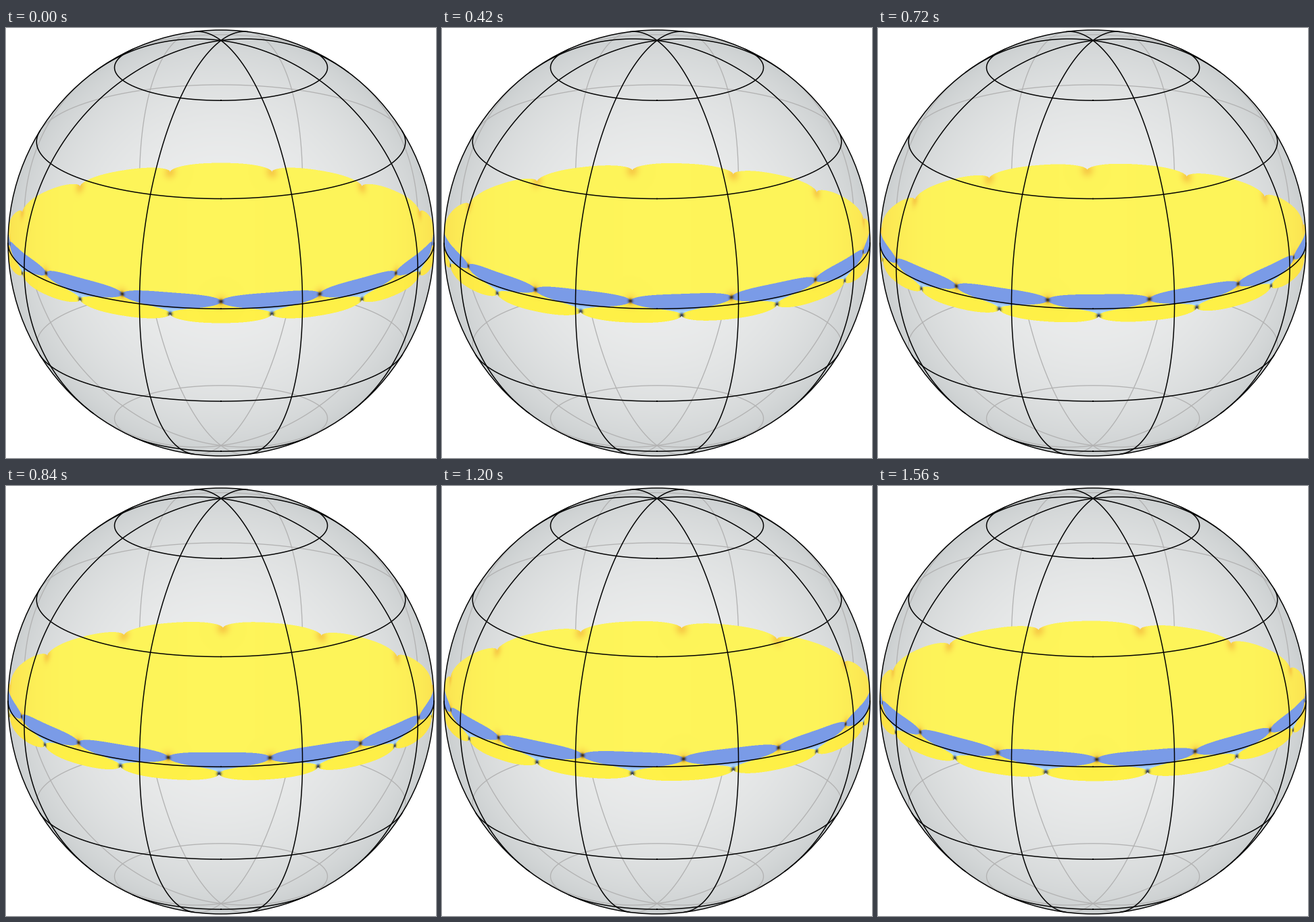
A matplotlib script that plays this animation: 636 px wide and 636 px high, repeating every 1620 ms.

```python
import numpy as np
import matplotlib.pyplot as plt
from matplotlib.animation import FuncAnimation
from matplotlib.patches import Circle

SIZE, FRAMES, INTERVAL = 636, 27, 60
CENTER, R = 318, 315
TILT = np.radians(18)
SIN, COS = np.sin(TILT), np.cos(TILT)

LOBES = 13            # corrugations around the equator
RIM = 0.998           # radius of the corrugated band
H = 0.0355            # height of a cusp, and half the height of a lobe
Y0, Y1, SS = 190, 446, 2

YELLOW = (254, 245, 90)
LOBE_YELLOW = (255, 241, 72)
ORANGE = (244, 184, 62)
BLUE = (122, 155, 231)
PALE_BLUE = (178, 222, 255)
BROWN = (58, 38, 8)
NAVY = (28, 40, 84)

fig = plt.figure(figsize=(SIZE / 100, SIZE / 100), dpi=100, facecolor="white")
ax = fig.add_axes([0, 0, 1, 1])
ax.axis("off")


def px(width):
    return width * 72 / 100


def project(x, y, z):
    """Screen position and depth; y points towards the viewer, z to the pole."""
    up = z * COS - y * SIN
    return CENTER + R * x, CENTER - R * up, y * COS + z * SIN


def draw_curve(x, y, z):
    sx, sy, depth = project(x, y, z)
    for shown, color, width, order in ((depth < 0, "#b2b2b2", 1.3, 2),
                                       (depth >= 0, "black", 1.5, 4)):
        ax.plot(np.where(shown, sx, np.nan), sy, color=color,
                lw=px(width), zorder=order)


def draw_globe():
    py, pxs = np.mgrid[0:SIZE, 0:SIZE] + 0.5
    rho2 = ((pxs - CENTER) ** 2 + (py - CENTER) ** 2) / R ** 2
    facing = np.sqrt(np.clip(1 - rho2, 0, 1))[..., None]
    shade = np.array([202, 206, 207]) + np.array([36, 33, 32]) * facing ** 1.4
    disc = ax.imshow(shade / 255, extent=(0, SIZE, SIZE, 0), zorder=1,
                     interpolation="nearest")
    disc.set_clip_path(Circle((CENTER, CENTER), R, transform=ax.transData))
    ax.add_patch(Circle((CENTER, CENTER), R, fill=False, ec="black",
                        lw=px(1.5), zorder=5))

    a = np.linspace(0, 2 * np.pi, 1441)
    for lat in np.radians([-60, -30, 0, 30, 60]):
        draw_curve(np.cos(lat) * np.sin(a), np.cos(lat) * np.cos(a),
                   np.full_like(a, np.sin(lat)))
    for lon in np.radians([22.5, 67.5, 112.5, 157.5]):
        draw_curve(np.cos(a) * np.sin(lon), np.cos(a) * np.cos(lon), np.sin(a))


# Each sample of the band region, traced to the front and back of the rim.
gx = ((np.arange(SIZE * SS) + 0.5) / SS - CENTER) / R
gy = (CENTER - Y0 - (np.arange((Y1 - Y0) * SS) + 0.5) / SS) / R
reach = np.sqrt(np.clip(RIM ** 2 - gx ** 2, 0, None))
angle = np.arcsin(np.clip(gx / RIM, -1, 1))
z_front = ((gy[:, None] + reach * SIN) / COS).astype(np.float32)
z_back = ((gy[:, None] - reach * SIN) / COS).astype(np.float32)
inside = np.abs(gx) < RIM


def lobe_pos(theta, phase):
    """0 in the middle of an upper lobe, 1 at its cusps."""
    turn = theta * LOBES / (2 * np.pi) + phase
    return np.abs(2 * (turn % 1) - 1).astype(np.float32)


def bulge(u):
    return np.sqrt(np.clip(1 - u ** 2.6, 0, 1))


def spot(du, dz, wide, high):
    return np.exp(-(du / wide) ** 2) * np.exp(-(dz / (high * H)) ** 2)


def blend(img, color, weight):
    img += weight[..., None] * (np.array(color, np.float32) - img)


def band(phase):
    u = lobe_pos(angle, phase)
    ub = lobe_pos(np.pi - angle, phase)
    up, low = bulge(u), bulge(1 - u)
    top, bottom = H * (1 + up), -H * (1 + low)
    back_top = H * (1 + bulge(ub))
    seam = H * (low - up)

    cover = inside & (z_back <= back_top) & (z_front >= bottom)
    face = z_front < top
    blue = face & (z_front > seam)

    img = np.empty(z_front.shape + (3,), np.float32)
    img[:] = YELLOW
    img[face] = LOBE_YELLOW
    side = np.broadcast_to(0.3 * gx ** 8, z_front.shape)
    blend(img, ORANGE, side)
    blend(img, ORANGE, 0.6 * spot(1 - u, z_front - H, 0.13, 0.9))
    blend(img, ORANGE, 0.65 * spot(1 - ub, z_back - H, 0.12, 0.9))
    img[blue] = BLUE
    pale = np.clip((H * (1 - up) - z_front) / (0.45 * H), 0, 1)
    blend(img, PALE_BLUE, pale * blue)
    blend(img, BROWN, 0.95 * spot(1 - u, z_front - H, 0.045, 0.3))
    blend(img, NAVY, 0.95 * spot(u, z_front + H, 0.045, 0.33))

    rgba = np.dstack([img / 255, cover.astype(np.float32)])
    rows, cols = Y1 - Y0, SIZE
    return np.clip(rgba.reshape(rows, SS, cols, SS, 4).mean(axis=(1, 3)), 0, 1)


draw_globe()
sheet = ax.imshow(band(0), extent=(0, SIZE, Y1, Y0), zorder=3,
                  interpolation="nearest")
ax.set_xlim(0, SIZE)
ax.set_ylim(SIZE, 0)
ax.set_aspect("auto")


def update(i):
    sheet.set_data(band(i / FRAMES))
    return [sheet]


anim = FuncAnimation(fig, update, frames=FRAMES, interval=INTERVAL,
                     repeat=True, repeat_delay=0)
plt.show()
```
